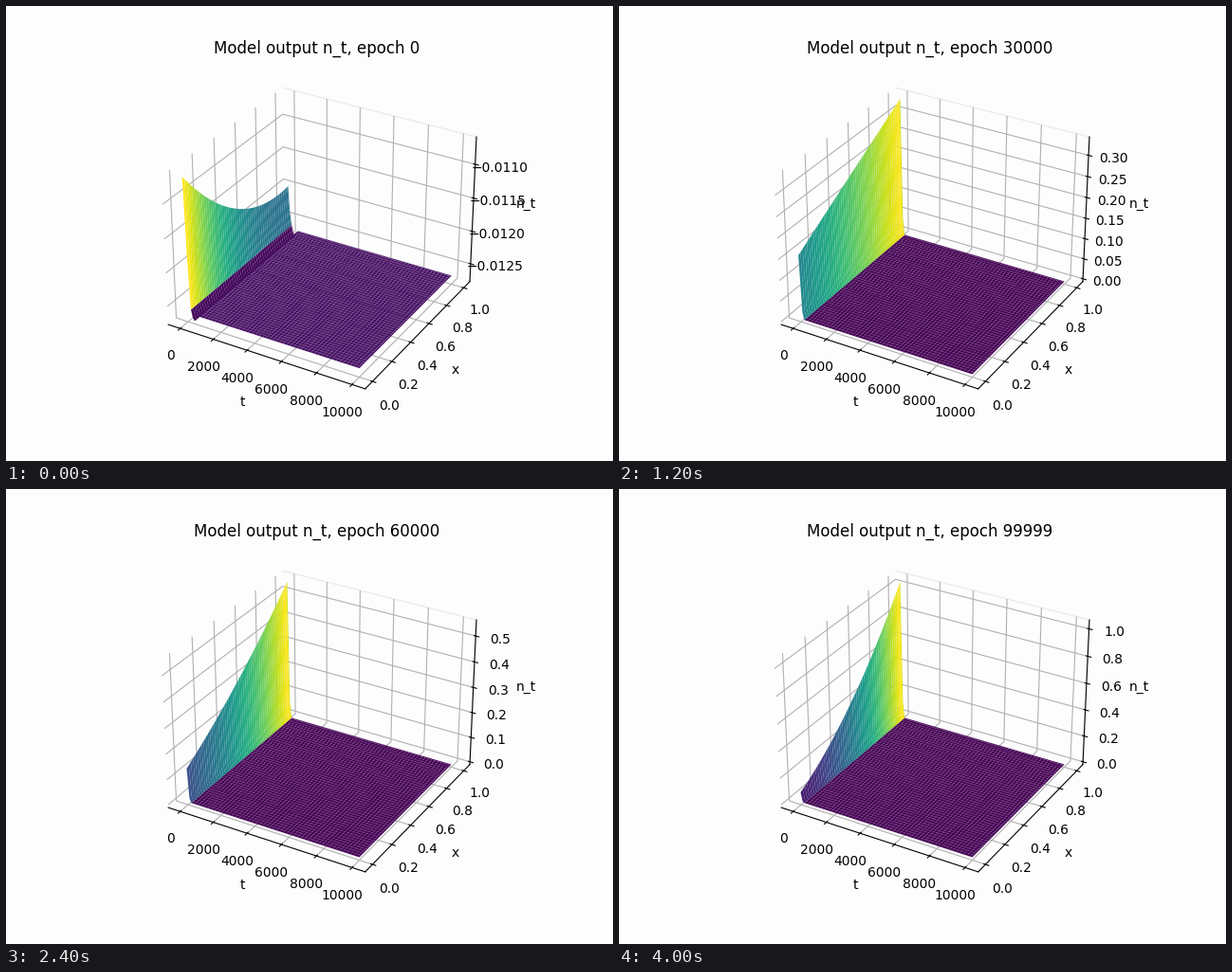
Recreate the animation shown at these times as a matplotlib script. Size 640 by 480 pixels, loop 4100 ms.

```python
import numpy as np
import matplotlib.pyplot as plt
from matplotlib.animation import FuncAnimation

FRAMES = 41
INTERVAL = 100
BACKGROUND = "#fdfdfd"

t = np.linspace(0, 10000, 100)
x = np.linspace(0, 1, 100)
T, X = np.meshgrid(t, x)

# Fit of the initial spike over training: peak height at x = 1,
# relative height at x = 0, and how far the edge sags between them.
EPOCHS = [2500, 5000, 7500, 20000, 40000, 60000, 75000, 99999]
PEAK = [0.20, 0.255, 0.279, 0.302, 0.370, 0.550, 0.700, 1.043]
START = [0.42, 0.37, 0.364, 0.551, 0.364, 0.242, 0.146, 0.070]
SAG = [0.0, 0.01, 0.015, -0.02, 0.015, 0.05, 0.08, 0.115]


def untrained():
    """Randomly initialised model: a bowl-shaped spike, a dip, then flat."""
    floor = 0.043
    edge = 1 - 1.418 * x + 0.781 * x**2
    u = np.full_like(T, floor)
    u[:, 0] = edge
    u[:, 1] = floor + 0.4 * (edge - floor)
    u[:, 2:6] = [0.076, 0.02, 0.0, 0.02]
    return -0.012733 + 0.002087 * u


def trained(epoch):
    peak, start, sag = (np.interp(epoch, EPOCHS, v) for v in (PEAK, START, SAG))
    edge = start + (1 - start) * x - 4 * sag * x * (1 - x)
    z = np.zeros_like(T)
    z[:, 0] = peak * edge
    z[:, 1] = 0.12 * peak * edge
    return z


fig = plt.figure(figsize=(6.4, 4.8), dpi=100, facecolor=BACKGROUND)
ax = fig.add_subplot(projection="3d", facecolor=BACKGROUND)


def draw(i):
    epoch = min(2500 * i, 99999)
    ax.clear()
    for axis, edge in ((ax.xaxis, BACKGROUND), (ax.yaxis, "#ebebeb"), (ax.zaxis, BACKGROUND)):
        axis.set_pane_color(BACKGROUND)
        axis.pane.set_edgecolor(edge)
    ax.plot_surface(T, X, trained(epoch) if epoch else untrained(), cmap="viridis")
    ax.set_title(f"Model output n_t, epoch {epoch}")
    ax.set_xlabel("t")
    ax.set_ylabel("x")
    ax.set_zlabel("n_t")
    return []


anim = FuncAnimation(fig, draw, frames=FRAMES, interval=INTERVAL, repeat=True)
plt.show()
```
